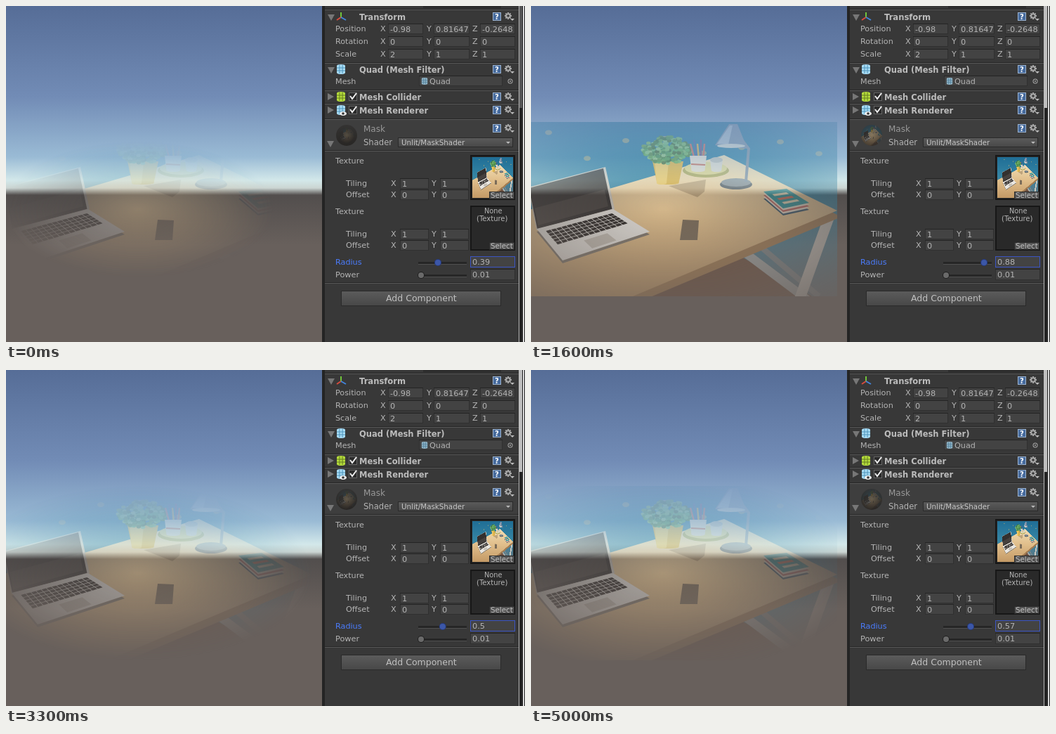
An HTML page with a canvas that plays this animation: 739x478 px, repeating every 5700 ms.

```html
<!DOCTYPE html>
<html lang="en">
<head>
<meta charset="utf-8">
<title>Mask shader inspector</title>
<style>
html, body { margin: 0; width: 100%; height: 100%; overflow: hidden; background: #383838; }
canvas { display: block; }
</style>
</head>
<body>
<canvas id="stage" width="739" height="478"></canvas>
<script>
const LOOP = 5700;
const QUAD = { x: -60, y: 165, w: 496, h: 248 };
const FONT = '"DejaVu Sans", sans-serif';
const LABEL = '#b4b4b4', BOLD = '#bcbcbc', SILVER = '#e8e5df';

// Slider drags; each one starts from where the last one ended.
const drags = [
  { from: 800, to: 1100, value: 0.75 },
  { from: 1200, to: 1600, value: 0.88 },
  { from: 1600, to: 2000, value: 0.5 },
  { from: 2000, to: 2500, value: 0.34 },
  { from: 2600, to: 3300, value: 0.5 },
  { from: 3400, to: 3800, value: 0.64 },
  { from: 3900, to: 4200, value: 0.52 },
  { from: 4500, to: 4800, value: 0.57 }
];

function radiusAt(time) {
  const tick = Math.floor(time / 100) * 100;
  const radius = drags.reduce((value, drag) => {
    const progress = Math.min(1, Math.max(0, (tick - drag.from) / (drag.to - drag.from)));
    return value + (drag.value - value) * progress;
  }, 0.39);
  return Math.round(radius * 100) / 100;
}

function seeded(seed) {
  return () => (seed = seed * 16807 % 2147483647) / 2147483647;
}

let g;

function rect(x, y, w, h, fill) {
  g.fillStyle = fill;
  g.fillRect(x, y, w, h);
}

function frame(x, y, w, h, stroke) {
  g.strokeStyle = stroke;
  g.lineWidth = 1;
  g.strokeRect(x + 0.5, y + 0.5, w - 1, h - 1);
}

function trace(points) {
  g.beginPath();
  for (const [x, y] of points) g.lineTo(x, y);
}

function poly(fill, ...points) {
  trace(points);
  g.fillStyle = fill;
  g.fill();
}

function line(stroke, width, ...points) {
  trace(points);
  g.strokeStyle = stroke;
  g.lineWidth = width;
  g.stroke();
}

function oval(fill, x, y, rx, ry = rx) {
  g.beginPath();
  g.ellipse(x, y, rx, ry, 0, 0, 7);
  g.fillStyle = fill;
  g.fill();
}

function text(str, x, y, size = 11.2, fill = LABEL, weight = 400) {
  g.font = `${weight} ${size}px ${FONT}`;
  g.fillStyle = fill;
  g.fillText(str, x, y);
}

function vertical(y0, y1, ...stops) {
  const gradient = g.createLinearGradient(0, y0, 0, y1);
  for (const [y, color] of stops) gradient.addColorStop((y - y0) / (y1 - y0), color);
  return gradient;
}

function layer(w, h, draw) {
  const canvas = document.createElement('canvas');
  canvas.width = w;
  canvas.height = h;
  g = canvas.getContext('2d');
  draw();
  return canvas;
}

// ---- Desk picture, drawn in stage coordinates ----

// A four-cornered surface; returns a painter for parts of it in 0..1 coordinates.
function surface(a, b, c, d) {
  const mix = (p, q, t) => [p[0] + (q[0] - p[0]) * t, p[1] + (q[1] - p[1]) * t];
  const at = (u, v) => mix(mix(a, b, u), mix(d, c, u), v);
  return (fill, u = 0, v = 0, w = 1, h = 1) =>
    poly(fill, at(u, v), at(u + w, v), at(u + w, v + h), at(u, v + h));
}

function cup(fill, x, top, bottom, radius, taper) {
  poly(fill, [x - radius, top], [x + radius, top], [x + radius * taper, bottom], [x - radius * taper, bottom]);
  oval(fill, x, bottom, radius * taper, 2);
}

function drawPlant() {
  const random = seeded(41);
  cup('#d9ae43', 195, 221, 252, 22, 0.7);
  cup('#ecc765', 186, 222, 252, 10, 0.7);
  for (let i = 0; i < 260; i++) {
    const angle = random() * 2 * Math.PI, spread = Math.sqrt(random());
    const x = 193 + Math.cos(angle) * spread * 35, y = 205 + Math.sin(angle) * spread * 19;
    oval(`hsl(${105 + random() * 25} 32% ${30 + random() * 32}%)`, x, y, 3.2, 2.4);
  }
}

function drawTray() {
  oval('#a9a45a', 249, 234, 33, 10);
  oval('#ddd28c', 249, 231, 30, 9);
  ['#c9655a', '#445f9c', '#d9a648', '#6d4f80', '#c9655a'].forEach((color, i) =>
    line(color, 2.5, [233 + i * 3, 218], [227 + i * 5, 196 - i % 2 * 6]));
  cup('#e0d8cc', 238, 213, 234, 12, 0.8);
  line('#c0685a', 2, [228, 225], [248, 226]);
  cup('#d9d5cc', 264, 219, 234, 9, 0.8);
  oval('#b9bab5', 264, 219, 9, 4);
}

function drawLamp() {
  oval('#4d5862', 292, 254, 23, 7);
  oval('#818b93', 292, 251, 21, 6);
  line('#78889a', 4, [296, 185], [310, 203], [306, 250]);
  poly('#7488a0', [282, 168], [294, 168], [308, 203], [262, 198]);
  poly('#a6b5c4', [283, 170], [287, 170], [281, 197], [265, 196]);
  oval('#cfd0c8', 285, 199, 20, 3);
}

function drawLaptop() {
  const lid = surface([-4, 258], [106, 229], [119, 289], [8, 319]);
  lid('#cfc9bf');
  lid('#33302f', 0.01, 0.02, 0.96, 0.96);
  lid('#45403d', 0.03, 0.5, 0.9, 0.4);
  const base = surface([8, 317], [117, 289], [169, 321], [45, 362]);
  g.save();
  g.translate(0, 4);
  base('#7f776c');
  g.restore();
  base(SILVER);
  for (let row = 0; row < 5; row++) {
    for (let col = 0; col < 13; col++) {
      base('#2b2725', 0.08 + col * 0.066, 0.12 + row * 0.09, 0.057, 0.076);
    }
  }
  base('#c6c0b6', 0.36, 0.66, 0.28, 0.28);
}

function drawBooks() {
  const cover = surface([331, 264], [364, 260], [396, 280], [359, 288]);
  g.save();
  g.translate(0, 10);
  for (const color of ['#36566b', '#e6dac8', '#c2665f', '#e6dac8', '#2f959c']) {
    cover(color);
    g.translate(0, -2.5);
  }
  g.translate(0, 2.5);
  ['#e4d8b8', '#d0705c', '#e4d8b8'].forEach((color, i) => cover(color, 0.2, 0.2 + i * 0.24, 0.6, 0.12));
  g.restore();
}

function drawPicture() {
  g.translate(-QUAD.x, -QUAD.y);
  rect(QUAD.x, QUAD.y, QUAD.w, QUAD.h, vertical(165, 413, [165, '#206e96'], [280, '#3585a4'], [413, '#66757d']));
  const random = seeded(7);
  for (let x = 25; x < 430; x += 55) oval('#87997f', x, 180 + random() * 40, 5, 3.5);

  poly('#6e5140', [150, 413], [300, 357], [400, 413]);
  line('#a4a9a8', 12, [306, 352], [394, 418]);
  line('#7d888c', 8, [330, 345], [410, 413]);
  line('#c9c7c0', 15, [426, 296], [382, 418]);

  const corners = [[-60, 305], [115, 259], [275, 212], [436, 291], [145, 413], [-60, 413]];
  g.save();
  g.translate(6, 9);
  poly('#a47d52', ...corners);
  g.restore();
  poly(vertical(212, 413, [212, '#f1dcb4'], [300, '#e2c18e'], [413, '#c49a66']), ...corners);
  poly('#bea47c', [196, 256], [249, 247], [247, 264], [237, 272]);
  drawPlant();
  drawTray();
  drawLamp();
  drawLaptop();
  drawBooks();
  surface([216, 304], [239, 305], [237, 333], [212, 333])('#7b6c59');
}

// ---- Inspector widgets ----

function field(value, x, y, w, h = 15) {
  rect(x, y, w, h, '#434343');
  frame(x, y, w, h, '#303030');
  rect(x, y, w, 1, '#242424');
  g.save();
  g.beginPath();
  g.rect(x, y, w - 1, h);
  g.clip();
  text(value, x + 3, y + h / 2 + 4, 11.3);
  g.restore();
}

function axis(name, value, x, y, gap, w) {
  text(name, x, y + 11);
  field(value, x + gap, y, w);
}

function foldout(x, y, open) {
  g.save();
  g.translate(x, y);
  if (open) g.rotate(Math.PI / 2);
  poly('#777', [-4, -5], [5, 0], [-4, 5]);
  g.restore();
}

function headerIcons(y) {
  rect(693, y - 6, 12, 12, '#456a9d');
  frame(693, y - 6, 12, 12, '#9db3ce');
  text('?', 696, y + 4, 10, '#fff', 700);
  for (let i = 0; i < 8; i++) {
    const a = i * Math.PI / 4;
    line('#aaa', 2, [715, y - 1], [715 + 5 * Math.cos(a), y - 1 + 5 * Math.sin(a)]);
  }
  oval('#aaa', 715, y - 1, 3.6);
  oval('#383838', 715, y - 1, 1.8);
  poly('#bbb', [718, y + 3], [724, y + 3], [721, y + 6]);
}

function meshIcon(x, y, fill, edge, scale = 1) {
  g.save();
  g.translate(x, y);
  g.scale(scale, scale);
  rect(-6, -5, 12, 10, fill);
  oval(fill, 0, -5, 6, 2);
  oval(fill, 0, 5, 6, 2);
  for (const p of [-2, 2]) {
    line(edge, 1, [p, -6], [p, 6]);
    line(edge, 1, [-6, p], [6, p]);
  }
  g.restore();
}

function checkbox(x, y) {
  rect(x, y, 12, 12, '#292929');
  frame(x, y, 12, 12, '#666');
  line('#eee', 2, [x + 2, y + 5], [x + 5, y + 9], [x + 11, y + 1]);
}

function separator(y) {
  rect(454, y - 1, 276, 1, '#262626');
  rect(454, y, 276, 1, '#585858');
}

function button(x, y, w, h) {
  rect(x, y, w, h, vertical(y, y + h, [y, '#5c5c5c'], [y + h, '#474747']));
  frame(x, y, w, h, '#2a2a2a');
}

function textureSlot(y, drawContent) {
  text('Texture', 469, y + 12);
  [['Tiling', '1'], ['Offset', '0']].forEach(([name, value], i) => {
    const top = y + 33 + i * 16;
    text(name, 484, top + 11);
    axis('X', value, 548, top, 13, 41);
    axis('Y', value, 606, top, 12, 41);
  });
  rect(661, y, 64, 64, '#171717');
  rect(663, y + 2, 60, 60, '#292929');
  drawContent();
  button(688, y + 52, 36, 11);
  text('Select', 690, y + 61, 10.3, '#c0c0c0');
}

function slider(radius, y, fill, edge) {
  const x = 591 + radius * 61.5;
  rect(587, y - 1, 69, 3, '#262626');
  rect(587, y + 2, 69, 1, '#505050');
  oval(edge, x, y, 5);
  oval(fill, x, y, 4);
}

function drawTransform() {
  foldout(463, 16, true);
  line('#71c53a', 2, [477, 16], [477, 9]);
  line('#d94c3d', 2, [477, 16], [471, 20]);
  line('#4385dc', 2, [477, 16], [484, 20]);
  text('Transform', 503, 20, 11.6, BOLD, 700);
  headerIcons(15);
  [
    ['Position', '-0.98', '0.81647', '-0.2648'],
    ['Rotation', '0', '0', '0'],
    ['Scale', '2', '1', '1']
  ].forEach(([name, x, y, z], i) => {
    const top = 25 + i * 18;
    text(name, 469, top + 11);
    axis('X', x, 533, top, 11, 50);
    axis('Y', y, 599, top, 10, 51);
    axis('Z', z, 664, top, 11, 50);
  });
}

function drawMeshes() {
  const blue = ['#a9dcf5', '#4c93b9'], green = ['#b5dc3c', '#657d20'];
  foldout(463, 91, true);
  meshIcon(477, 90, ...blue);
  text('Quad (Mesh Filter)', 503, 95, 11.5, BOLD, 700);
  headerIcons(90);
  text('Mesh', 469, 111);
  field('', 588, 99, 119);
  meshIcon(596, 107, '#8fb2c4', '#4c7d99', 0.7);
  text('Quad', 603, 111);
  oval('#aaa', 718, 107, 3.5);
  oval('#383838', 718, 107, 2.5);
  oval('#aaa', 718, 107, 1);

  [['Mesh Collider', green], ['Mesh Renderer', blue]].forEach(([name, colors], i) => {
    const y = 129 + i * 19;
    foldout(462, y, false);
    meshIcon(477, y, ...colors);
    checkbox(488, y - 6);
    text(name, 503, y + 5, 11.5, BOLD, 700);
    headerIcons(y);
  });
  oval('#eee', 480, 153, 5, 3);
  oval('#333', 480, 153, 1.8);
}

function drawMaterial() {
  foldout(462, 196, true);
  text('Mask', 509, 179, 12, '#999');
  headerIcons(174);
  text('Shader', 509, 198, 11.6);
  button(558, 187, 164, 14);
  text('Unlit/MaskShader', 563, 198, 10.3, '#c8c8c8');
  poly('#bbb', [712, 193], [718, 193], [715, 196]);

  textureSlot(212, () => g.drawImage(picture, 664, 215, 58, 58));
  textureSlot(284, () => {
    text('None', 681, 295, 9.8);
    text('(Texture)', 670, 306, 10);
  });

  text('Radius', 469, 368, 11.2, '#4b7dff');
  text('Power', 469, 386, 11.3);
  slider(0, 383, '#6a6a6a', '#1f1f1f');
  field('0.01', 661, 374, 64, 16);
}

function drawPanel() {
  rect(450, 0, 289, 478, '#383838');
  rect(450, 0, 4, 478, '#242424');
  rect(454, 161, 276, 44, '#3e3e3e');
  rect(594, 0, 111, 3, '#2c2c2c');
  [5, 81, 120, 139, 161, 206, 394].forEach(separator);
  drawTransform();
  drawMeshes();
  drawMaterial();
  button(477, 405, 228, 22);
  text('Add Component', 541, 420, 12.5, '#c0c0c0');

  rect(730, 0, 9, 478, '#242424');
  rect(730, 0, 1, 478, '#b8b8b8');
  rect(736, 0, 2, 478, '#d8d8d8');
}

function drawSky() {
  rect(0, 0, 450, 478, vertical(0, 478,
    [0, '#566d97'], [130, '#728cb6'], [215, '#9abbd5'], [248, '#d3e8ea'],
    [259, '#cbd5d2'], [269, '#524e4d'], [340, '#68605c']));
}

const picture = layer(QUAD.w, QUAD.h, drawPicture);
const backdrop = layer(739, 478, () => { drawSky(); drawPanel(); });
const masked = layer(QUAD.w, QUAD.h, () => {});
const stage = document.getElementById('stage').getContext('2d');

// Opacity falls off with distance from the centre, measured in texture coordinates.
function applyMask(radius) {
  g = masked.getContext('2d');
  g.clearRect(0, 0, QUAD.w, QUAD.h);
  g.drawImage(picture, 0, 0);
  g.save();
  g.globalCompositeOperation = 'destination-in';
  g.translate(QUAD.w / 2, QUAD.h / 2);
  g.scale(QUAD.w, QUAD.h);
  const fade = g.createRadialGradient(0, 0, 0, 0, 0, radius);
  fade.addColorStop(0, `rgba(0,0,0,${radius})`);
  fade.addColorStop(1, 'rgba(0,0,0,0)');
  rect(-0.5, -0.5, 1, 1, fade);
  g.restore();
}

function drawPreview() {
  g.save();
  g.beginPath();
  g.arc(485, 184, 15, 0, 7);
  g.clip();
  rect(470, 169, 30, 30, vertical(169, 199, [169, '#343332'], [199, '#282624']));
  g.globalAlpha = 0.55;
  g.drawImage(masked, 470, 169, 30, 30);
  g.restore();
}

function render() {
  const time = performance.now() % LOOP;
  const radius = radiusAt(time);
  applyMask(radius);
  g = stage;
  g.drawImage(backdrop, 0, 0);
  g.drawImage(masked, QUAD.x, QUAD.y);
  drawPreview();
  slider(radius, 365, '#3c57a8', '#263a7c');
  field(String(radius), 661, 356, 64, 16);
  frame(661, 356, 64, 16, '#3b55c4');
  rect(731, 0, 4, 145, time < 900 ? '#5a5a5a' : '#c0c0c0');
  requestAnimationFrame(render);
}

render();
</script>
</body>
</html>
```
